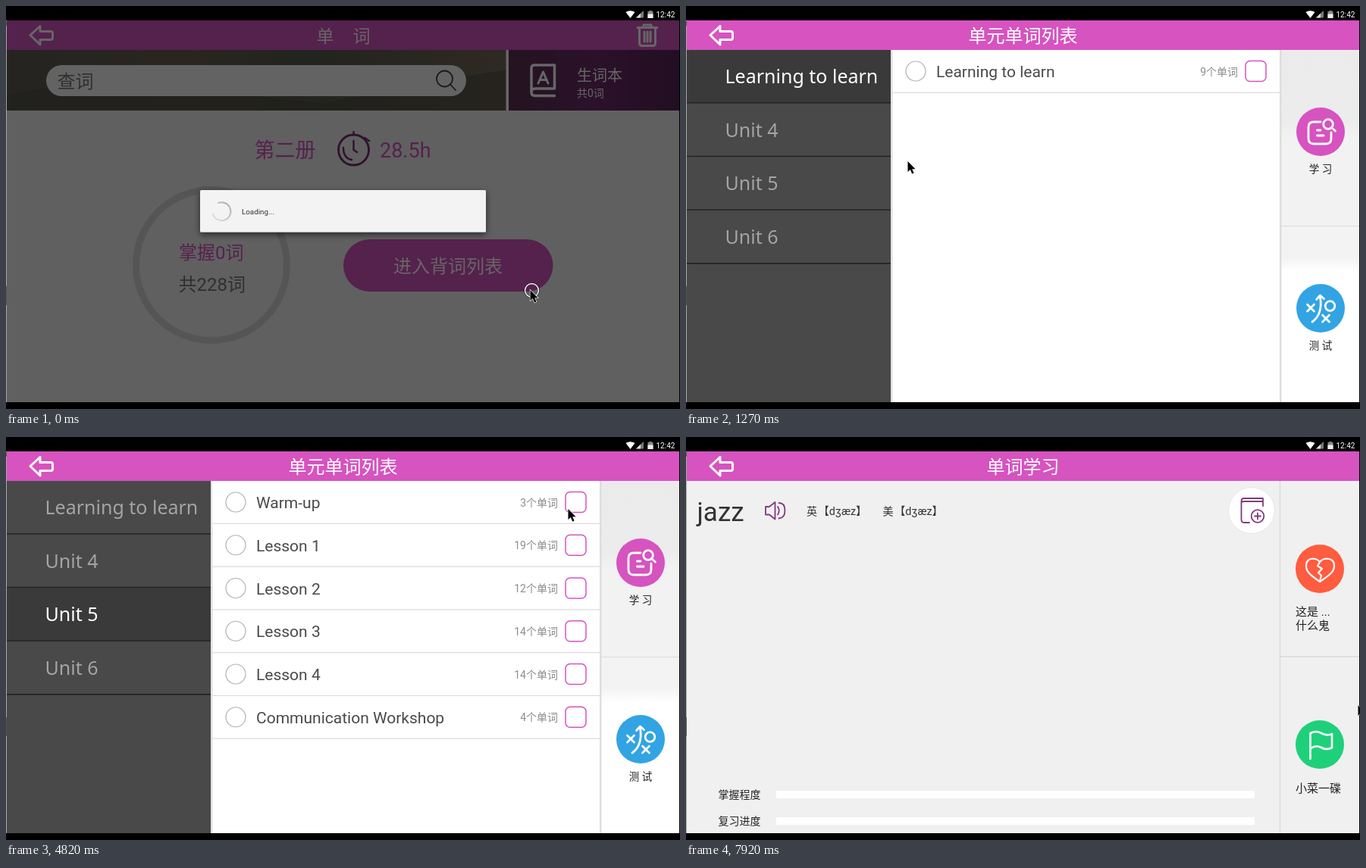
Recreate the animation shown at these times as an HTML page. Size 889 px wide and 532 px high, loop 8 s.

```html
<!DOCTYPE html>
<html lang="zh-CN">
<head>
<meta charset="utf-8">
<title>单词</title>
<style>
html, body { margin: 0; width: 100%; height: 100%; overflow: hidden; background: #000; }
svg { display: block; width: 889px; height: 532px; }
text { font-family: Roboto, "Noto Sans CJK SC", "Noto Sans CJK", sans-serif; white-space: pre; }
.units text { font: 25px "Noto Sans", "Open Sans", sans-serif; }
.line { fill: none; stroke-linecap: round; stroke-linejoin: round; }
#list, #study, #unitA, #unitB, #picked, #cursor, #ring { animation: 8s step-end infinite; }
#list { animation-name: list; }
#study { animation-name: study; }
#unitA { animation-name: unitA; }
#unitB { animation-name: unitB; }
#picked { animation-name: picked; }
#cursor { animation-name: cursor; }
#ring { animation-name: ring; }
@keyframes list {
  0% { opacity: 0; transform: translateY(12px); }
  1.875% { opacity: .84; transform: translateY(12px); }
  4.5%, 100% { opacity: 1; transform: none; }
}
@keyframes study {
  0% { opacity: 0; transform: translateY(12px); }
  86.125% { opacity: .84; transform: translateY(12px); }
  88%, 100% { opacity: 1; transform: none; }
}
@keyframes unitA { 0% { opacity: 1; } 23.375%, 100% { opacity: 0; } }
@keyframes unitB { 0% { opacity: 0; } 23.375%, 100% { opacity: 1; } }
@keyframes picked { 0% { opacity: 0; } 67.75%, 100% { opacity: 1; } }
@keyframes ring {
  0%, 21.5%, 65.875%, 82.5% { opacity: 1; }
  1.875%, 23.375%, 67.75%, 84.375%, 100% { opacity: 0; }
}
@keyframes cursor {
  0% { transform: translate(691px, 375px); }
  4.5% { transform: translate(684px, 371px); }
  6.375% { transform: translate(640px, 346px); }
  8.25% { transform: translate(540px, 300px); }
  10.25% { transform: translate(420px, 250px); }
  12.125% { transform: translate(334px, 218px); }
  14% { transform: translate(300px, 208px); }
  15.875% { transform: translate(292px, 205px); }
  17.75% { transform: translate(262px, 215px); }
  19.625% { transform: translate(220px, 226px); }
  21.5% { transform: translate(196px, 230px); }
  25.125% { transform: translate(194px, 230px); }
  30.75% { transform: translate(230px, 224px); }
  32.625% { transform: translate(340px, 200px); }
  34.5% { transform: translate(460px, 180px); }
  36.25% { transform: translate(546px, 171px); }
  38.125% { transform: translate(549px, 169px); }
  39.875% { transform: translate(500px, 170px); }
  41.75% { transform: translate(427px, 169px); }
  43.5% { transform: translate(306px, 154px); }
  45.375% { transform: translate(240px, 148px); }
  47.25% { transform: translate(220px, 149px); }
  51% { transform: translate(250px, 154px); }
  52.875% { transform: translate(350px, 159px); }
  54.75% { transform: translate(500px, 156px); }
  56.625% { transform: translate(620px, 134px); }
  58.5% { transform: translate(710px, 107px); }
  60.25% { transform: translate(741px, 95px); }
  62.125% { transform: translate(747px, 90px); }
  64% { transform: translate(748px, 89px); }
  69.5% { transform: translate(750px, 92px); }
  71.375% { transform: translate(764px, 112px); }
  73.25% { transform: translate(800px, 165px); }
  75% { transform: translate(828px, 204px); }
  76.875% { transform: translate(836px, 213px); }
  88% { transform: translate(830px, 218px); }
  89.875% { transform: translate(790px, 234px); }
  91.625% { transform: translate(720px, 252px); }
  93.5% { transform: translate(660px, 267px); }
  95.375% { transform: translate(628px, 272px); }
  97.25% { transform: translate(760px, 315px); }
  99%, 100% { transform: translate(886px, 354px); }
}
</style>
</head>
<body>
<svg viewBox="0 0 889 532">
  <defs>
    <linearGradient id="photo">
      <stop offset="0" stop-color="#5c5a54"/>
      <stop offset=".35" stop-color="#68604f"/>
      <stop offset=".6" stop-color="#57584d"/>
      <stop offset="1" stop-color="#756a58"/>
    </linearGradient>
    <linearGradient id="plum">
      <stop offset="0" stop-color="#59304f"/>
      <stop offset=".5" stop-color="#6c2b6b"/>
      <stop offset="1" stop-color="#562356"/>
    </linearGradient>
    <linearGradient id="sideTop" x2="0" y2="1">
      <stop offset="0" stop-color="#ebebeb"/>
      <stop offset=".4" stop-color="#ececec"/>
      <stop offset=".5" stop-color="#f2f2f2"/>
      <stop offset="1" stop-color="#f2f2f2"/>
    </linearGradient>
    <linearGradient id="sideLow" x2="0" y2="1">
      <stop offset=".18" stop-color="#f3f3f3"/>
      <stop offset=".26" stop-color="#fff"/>
    </linearGradient>
    <linearGradient id="spin" x1="1" y1="0" x2="0" y2="1">
      <stop offset="0" stop-color="#aaa"/>
      <stop offset="1" stop-color="#e2e2e2"/>
    </linearGradient>
    <filter id="shade" x="-10%" y="-30%" width="120%" height="170%">
      <feDropShadow dx="0" dy="3" stdDeviation="4" flood-opacity=".6"/>
    </filter>
    <path id="back" class="line" stroke="#fff" stroke-width="3" d="M32 38.5 45 26.5V33.5H59Q61.500 33.500 61.500 36V42Q61.500 44.500 59 44.500H45V51Z"/>
  </defs>

  <g id="home">
    <rect x="1" y="19" width="887" height="504" fill="#f0f0f0"/>
    <rect x="1" y="19" width="887" height="39" fill="#d653c0"/>
    <use href="#back"/>
    <g class="line" stroke="#fff" stroke-width="3">
      <path d="M833 28.500H859M841 28V25H851V28M835.500 29V49Q835.500 52.500 839 52.500H853Q856.500 52.500 856.500 49V29M842 34V47M846 34V47M850 34V47"/>
    </g>
    <rect x="1" y="58" width="660" height="80" fill="url(#photo)"/>
    <path d="M1 118 130 92 260 112 420 128 560 100 660 84V138H1Z" fill="#4c4a40" opacity=".5"/>
    <rect x="663" y="58" width="225" height="80" fill="url(#plum)"/>
    <rect x="659.500" y="58" width="3.500" height="80" fill="#fff"/>
    <rect x="53" y="78" width="554" height="41" rx="20.500" fill="#fff" opacity=".96"/>
    <g class="line" stroke="#444" stroke-width="1.800">
      <circle cx="578.500" cy="96" r="10.500"/><path d="M586 103.500 593 111"/>
    </g>
    <g class="line" stroke="#fff" stroke-width="3.500">
      <path d="M693 114V82Q693 78 697 78H723.500V109H698Q693 109 693 114 693 118.500 698 118.500H723.500"/>
      <path d="M702 102 708.500 87 715 102M704.500 97.500H712.500" stroke-width="3"/>
    </g>
    <circle cx="271" cy="342" r="99.500" fill="none" stroke="#d6d6d6" stroke-width="9"/>
    <rect x="445" y="308" width="276.500" height="69" rx="34.500" fill="#d653c0"/>
    <g class="line" stroke="#752a70" stroke-width="2.800">
      <circle cx="458.500" cy="190" r="20"/>
      <path d="M458.500 178V190L463 193M458.500 169V166M473 174 479 178M445 187Q445 201 456 203" stroke-width="2.400"/>
    </g>
    <g id="homeText"></g>
    <rect x="1" y="19" width="887" height="504" opacity=".6"/>
    <rect x="256" y="243" width="377" height="55.500" rx="1.500" fill="#f3f3f3" filter="url(#shade)"/>
    <path class="line" d="M280 260A12 12 0 1 1 273 275" stroke="url(#spin)" stroke-width="2"/>
    <text x="311" y="275" font-size="9.800" fill="#333">Loading...</text>
  </g>

  <g id="list">
    <rect x="1" y="19" width="887" height="504" fill="#fff"/>
    <rect x="1" y="19" width="887" height="39" fill="#d653c0"/>
    <use href="#back"/>
    <rect x="1" y="58" width="269" height="465" fill="#494949"/>
    <rect x="270" y="58" width="2.500" height="465" fill="#e0e0e0"/>
    <rect x="785" y="58" width="103" height="232" fill="url(#sideTop)"/>
    <rect x="785" y="290" width="103" height="233" fill="url(#sideLow)"/>
    <rect x="785" y="290" width="103" height="1" fill="#dcdcdc"/>
    <rect x="783" y="58" width="2.500" height="465" fill="#dedede"/>
    <circle cx="837" cy="166" r="32" fill="#d653c0"/>
    <g class="line" stroke="#fff" stroke-width="2.800">
      <path d="M837 153H828Q821 153 821 160V175Q821 182 828 182H844Q851 182 851 175V167M832.500 164H837M832.500 171H841"/>
      <circle cx="847" cy="156" r="6.300"/><path d="M851.500 160.500 856.500 165"/>
    </g>
    <circle cx="837" cy="399" r="32" fill="#32a4e3"/>
    <g class="line" stroke="#fff" stroke-width="2.800">
      <path d="M819.500 394 828.500 403M828.500 394 819.500 403M839.500 408 848.500 417M848.500 408 839.500 417"/>
      <path d="M826 417Q840 407 836.500 384M831.500 387.500 836.500 382 841.500 386.500"/>
      <circle cx="849.500" cy="396" r="6.300"/>
    </g>
    <g id="listText"></g>
    <g id="unitA"></g>
    <g id="unitB"></g>
  </g>

  <g id="study">
    <rect x="1" y="19" width="887" height="504" fill="#f0f0f0"/>
    <rect x="1" y="19" width="887" height="39" fill="#d653c0"/>
    <use href="#back"/>
    <path d="M783.500 58V523M783 290H888" stroke="#dadada" stroke-width="1.500"/>
    <g class="line" stroke="#803a7c" stroke-width="1.800">
      <path d="M105 92H110L117.500 86V108.500L110 102.500H105ZM121 92Q124.500 97 121 102.500M122.500 87Q130.500 87 130.500 97T122.500 107.500"/>
    </g>
    <circle cx="746" cy="97" r="30.500" fill="#fff" stroke="#e6e6e6"/>
    <g class="line" stroke="#803a7c" stroke-width="1.800">
      <path d="M761 91V81H736Q732.500 81 732.500 85V109Q732.500 113 736 113H743M733 86Q734 85 737 85H760"/>
      <circle cx="754" cy="104.500" r="8.300"/><path d="M750 104.500H758M754 100.500V108.500"/>
    </g>
    <circle cx="836" cy="174" r="32" fill="#ff5c40"/>
    <g class="line" stroke="#fff" stroke-width="2.200">
      <path d="M836 165C832 159 818 158 818 170 818 180 828 185 836 191 844 185 855 180 855 170 855 158 840 159 836 165L833 170 839 174 834 179 838 183 836 190"/>
    </g>
    <circle cx="836" cy="406" r="32" fill="#1fd07a"/>
    <path class="line" stroke="#fff" stroke-width="2.600" d="M823.500 425V391Q831 387 838 391T852 392V410Q845 414 838 410T824 411"/>
    <rect x="119" y="467" width="631" height="10" fill="#fff"/>
    <rect x="119" y="502" width="631" height="10" fill="#fff"/>
    <g id="studyText"></g>
  </g>

  <g id="chrome">
    <path d="M0 0H889V19H0ZM0 523H889V532H0ZM888 19H889V523H888Z"/>
    <path d="M0.500 19V523" stroke="#a8a8a8"/>
    <path d="M0.500 20V26M0.500 370V395" stroke="#555"/>
    <path d="M817.500 8Q823.500 4.500 829.500 8L823.500 16Z" fill="#fff"/>
    <path d="M831 15.500H841V6Z" fill="#777"/><path d="M831 15.500H837V9.700Z" fill="#ddd"/>
    <path d="M846.500 7H848.500V6H851.500V7H853.500V16H846.500Z" fill="#888"/><path d="M846.500 10.500H853.500V16H846.500Z" fill="#eee"/>
    <text x="857.500" y="14.500" font-size="10" fill="#fff">12:42</text>
  </g>

  <g id="cursor">
    <g id="ring" fill="none">
      <circle cx="2.500" cy="0.500" r="10" stroke="#222" stroke-width="1"/>
      <circle cx="2.500" cy="0.500" r="9" stroke="#f4f4f4" stroke-width="1.400"/>
    </g>
    <path d="M0.500 0V14L3.800 11 6.200 16.500 8.600 15.400 6.200 10.200H10.500Z" stroke="#fff" stroke-width="1.200" paint-order="stroke"/>
  </g>
</svg>
<script>
const pink = '#d653c0';
const fill = (id, html) => { document.getElementById(id).innerHTML = html; };
const label = (x, y, size, color, str, anchor = 'start') =>
  `<text x="${x}" y="${y}" font-size="${size}" fill="${color}" text-anchor="${anchor}">${str}</text>`;

const units = ['Learning to learn', 'Unit 4', 'Unit 5', 'Unit 6'];
const sidebar = active => '<g class="units">' + units.map((name, i) => {
  const top = 58 + 70.6 * i;
  const on = i === active;
  return `<rect x="1" y="${top}" width="269" height="70.6" fill="${on ? '#3a3a3a' : '#494949'}"/>
    <rect x="1" y="${top + 69.2}" width="269" height="1.6" fill="#202020"/>
    <text x="51.500" y="${top + 44}" fill="${on ? '#fff' : '#a4a4a4'}">${name}</text>`;
}).join('') + '</g>';

const row = ([name, count], i) => {
  const y = 86 + 56.75 * i;
  const picked = i === 0 && name === 'Warm-up';
  const highlight = picked ? `<g id="picked">
    <rect x="272" y="58" width="511" height="56" fill="#ebd9e7"/>
    <path class="line" d="M744.500 86 749.500 91 759 81.500" stroke="${pink}" stroke-width="3"/></g>` : '';
  return `${highlight}
    <rect x="272" y="${y + 27.7}" width="511" height="1.200" fill="#dadada"/>
    <circle cx="303" cy="${y}" r="13" fill="none" stroke="#b2b2b2" stroke-width="1.200"/>
    <rect x="738" y="${y - 13.5}" width="27" height="27" rx="6" fill="none" stroke="${pink}" stroke-width="1.500"/>
    ${label(330, y + 8, 21, '#4a4a4a', name)}
    ${label(728, y + 5.5, 14, '#8c8c8c', count + '个单词', 'end')}`;
};

fill('homeText',
  label(409.5, 47.5, 23, '#fff', '单') + label(457.5, 47.5, 23, '#fff', '词') +
  label(67.5, 107.5, 24, '#777', '查词') +
  label(753, 98.5, 20, '#fff', '生词本') + label(753, 120, 14, '#fff', '共0词') +
  label(327.5, 200, 27, pink, '第二册') + label(493, 199.5, 27, pink, '28.5h') +
  label(228, 334, 24, pink, '掌握0词') + label(227.5, 375.5, 24, '#777', '共228词') +
  label(511, 352, 24, '#fff', '进入背词列表'));

fill('listText',
  label(372.5, 48, 24, '#fff', '单元单词列表') +
  label(837, 219.5, 13.5, '#222', '学 习', 'middle') +
  label(837, 453, 13.5, '#222', '测 试', 'middle'));

fill('unitA', sidebar(0) + row(['Learning to learn', 9], 0));
fill('unitB', sidebar(2) + '<rect x="272" y="58" width="511" height="60" fill="#fff"/>' + [
  ['Warm-up', 3], ['Lesson 1', 19], ['Lesson 2', 12],
  ['Lesson 3', 14], ['Lesson 4', 14], ['Communication Workshop', 4]
].map(row).join(''));

fill('studyText',
  label(396.5, 48, 24, '#fff', '单词学习') +
  label(14.5, 111, 35, '#333', 'jazz') +
  label(159, 103, 14, '#333', '英') + label(174.5, 103, 14.3, '#333', '【dʒæz】') +
  label(259.5, 103, 14, '#333', '美') + label(275, 103, 14.3, '#333', '【dʒæz】') +
  label(804, 236, 15, '#222', '这是 ...') + label(804, 254, 15, '#222', '什么鬼') +
  label(804, 468.5, 15, '#222', '小菜一碟') +
  label(42.5, 477, 14, '#222', '掌握程度') + label(42.5, 512, 14, '#222', '复习进度'));
</script>
</body>
</html>
```
